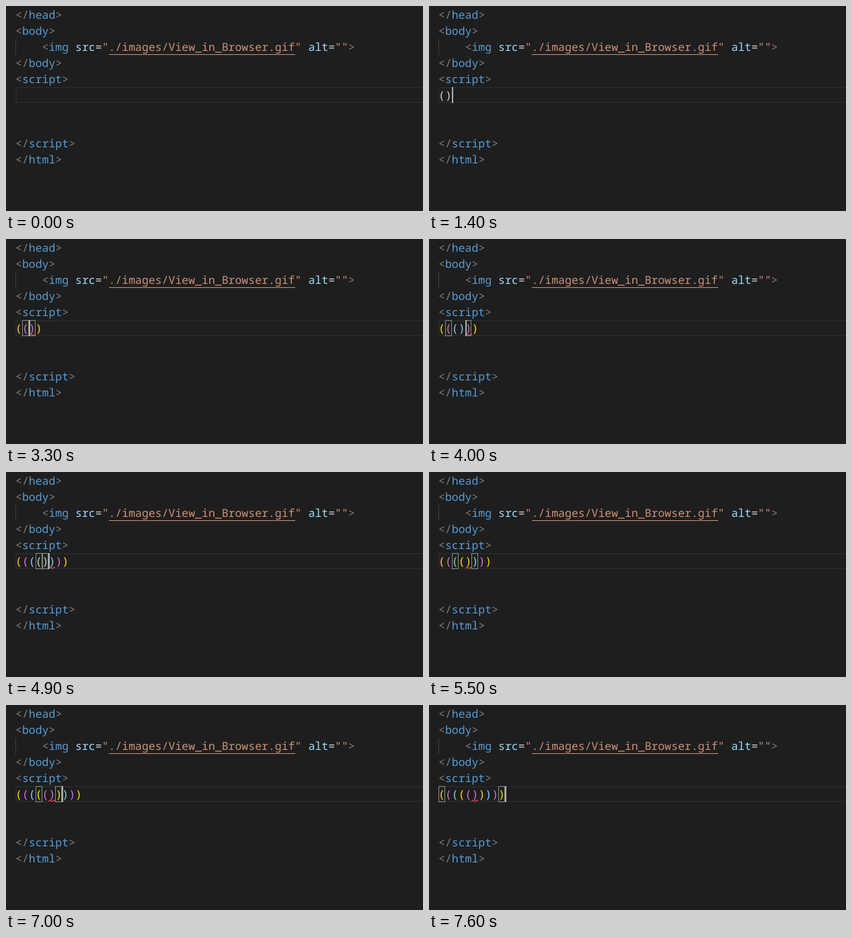
Animation of 620 by 306 pixels, one loop 8000 ms. Source, as an HTML page:

```html
<!DOCTYPE html>
<html lang="en">
<head>
<meta charset="utf-8">
<title>Bracket colours</title>
<style>
  html, body { margin: 0; width: 100%; height: 100%; overflow: hidden; background: #1e1e1e; }
  svg { display: block; }
  text {
    font: 16.495px "Noto Sans Mono", monospace;
    text-rendering: geometricPrecision;
    white-space: pre;
  }
</style>
</head>
<body>
<svg id="stage" width="620" height="306" viewBox="0 0 620 306"></svg>
<script>
const LEFT = 14, TOP = 1, CHAR = 9.897, ROW = 24, BASE = 18;
const EDIT_ROW = 5, LOOP = 8000;
const GREY = '#808080', BLUE = '#569cd6', SKY = '#9cdcfe', ORANGE = '#ce9178', PLAIN = '#d4d4d4';
const LEVELS = ['#ffd700', '#da70d6', '#87cefa'];

const stage = document.getElementById('stage');
const colX = col => LEFT + col * CHAR;
const snapX = col => Math.round(colX(col));
const rowY = row => TOP + row * ROW;
const editY = rowY(EDIT_ROW);

function add(parent, tag, attrs, content) {
  const el = document.createElementNS('http://www.w3.org/2000/svg', tag);
  for (const key in attrs) el.setAttribute(key, attrs[key]);
  if (content) el.textContent = content;
  parent.append(el);
  return el;
}

const word = (parent, row, col, str, fill) =>
  add(parent, 'text', { x: colX(col), y: rowY(row) + BASE, fill }, str);

// Writes [text, colour] tokens one after another.
function line(row, col, tokens) {
  for (const [str, fill] of tokens) {
    word(stage, row, col, str, fill);
    col += str.length;
  }
}

const tag = (open, name) => [[open, GREY], [name, BLUE], ['>', GREY]];

add(stage, 'rect', { width: 620, height: 306, fill: '#1e1e1e' });
add(stage, 'rect', {
  x: LEFT + 1, y: editY + 1, width: 700, height: ROW - 2,
  fill: 'none', stroke: '#282828', 'stroke-width': 2
});
add(stage, 'rect', { x: LEFT, y: rowY(2), width: 1, height: ROW, fill: '#404040' });

line(0, 0, tag('</', 'head'));
line(1, 0, tag('<', 'body'));
line(2, 4, [
  ['<', GREY], ['img', BLUE], [' ', PLAIN], ['src', SKY], ['=', PLAIN],
  ['"./images/View_in_Browser.gif"', ORANGE], [' ', PLAIN],
  ['alt', SKY], ['=', PLAIN], ['""', ORANGE], ['>', GREY]
]);
add(stage, 'rect', { x: snapX(14), y: 72, width: snapX(42) - snapX(14), height: 1, fill: ORANGE });
line(3, 0, tag('</', 'body'));
line(4, 0, tag('<', 'script'));
line(8, 0, tag('</', 'script'));
line(9, 0, tag('</', 'html'));

const live = add(stage, 'g', {});

// pairs: bracket pairs typed, tinted: pairs already coloured,
// caret / error: column, box: column of the boxed opening bracket (-1 hides).
const steps = [
  [0, { pairs: 0, tinted: 0, caret: -1, box: -1, error: -1 }],
  [600, { caret: 0 }],
  [1000, { caret: -1 }],
  [1400, { pairs: 1, caret: 2 }],
  [1500, { box: 0 }],
  [1600, { tinted: 1 }],
  [1900, { caret: -1 }],
  [2000, { error: 1 }],
  [2100, { caret: 1 }],
  [2500, { pairs: 2, caret: 2, error: 3 }],
  [2600, { caret: 3 }],
  [2800, { tinted: 2 }],
  [3000, { caret: -1 }],
  [3200, { caret: 2, error: 2 }],
  [3300, { box: 1 }],
  [3700, { pairs: 3, caret: 4, box: 2, error: 4 }],
  [3800, { box: 1 }],
  [4000, { tinted: 3 }],
  [4200, { caret: -1 }],
  [4400, { caret: 3, error: 3 }],
  [4500, { box: 2 }],
  [4900, { pairs: 4, caret: 5, box: 3, error: 5 }],
  [5000, { box: 2 }],
  [5100, { tinted: 4 }],
  [5400, { caret: -1 }],
  [5500, { error: 4 }],
  [5600, { caret: 4 }],
  [5700, { box: 3 }],
  [6000, { pairs: 5, caret: 5, error: 6 }],
  [6100, { caret: 6, box: 4 }],
  [6200, { box: 3 }],
  [6300, { tinted: 5 }],
  [6600, { caret: -1 }],
  [6700, { error: 5 }],
  [7000, { caret: 7 }],
  [7100, { box: 2 }],
  [7200, { caret: 8 }],
  [7300, { caret: 9, box: 1 }],
  [7400, { box: 0 }],
  [7600, { caret: 10 }]
];

let last = {};
const states = steps.map(([at, change]) => {
  last = { ...last, ...change, at };
  return last;
});

function drawBox(col) {
  const x = snapX(col);
  add(live, 'rect', {
    x: x + 0.5, y: editY + 0.5, width: snapX(col + 1) - x - 1, height: ROW - 1,
    fill: 'rgba(0,100,0,.1)', stroke: '#888'
  });
}

function drawError(col) {
  const x = snapX(col), y = editY + ROW - 1;
  add(live, 'path', {
    d: `M${x} ${y}l3 -2l3 2l3 -2l1 .7`,
    fill: 'none', stroke: '#f14c4c', 'stroke-width': 1.1
  });
}

function draw({ pairs, tinted, caret, box, error }) {
  live.replaceChildren();
  const end = pairs * 2 - 1;
  if (box >= 0) [box, end - box].forEach(drawBox);
  for (let col = 0; col <= end; col++) {
    const depth = Math.min(col, end - col);
    const fill = depth < tinted ? LEVELS[depth % LEVELS.length] : PLAIN;
    word(live, EDIT_ROW, col, col < pairs ? '(' : ')', fill);
  }
  if (error >= 0) drawError(error);
  if (caret >= 0) {
    add(live, 'rect', { x: snapX(caret), y: editY, width: 2, height: ROW, fill: '#aeafad' });
  }
}

let shown;
const start = performance.now();
function tick() {
  const time = (performance.now() - start) % LOOP;
  const state = states.findLast(s => s.at <= time);
  if (state !== shown) draw(shown = state);
  requestAnimationFrame(tick);
}
tick();
</script>
</body>
</html>
```
